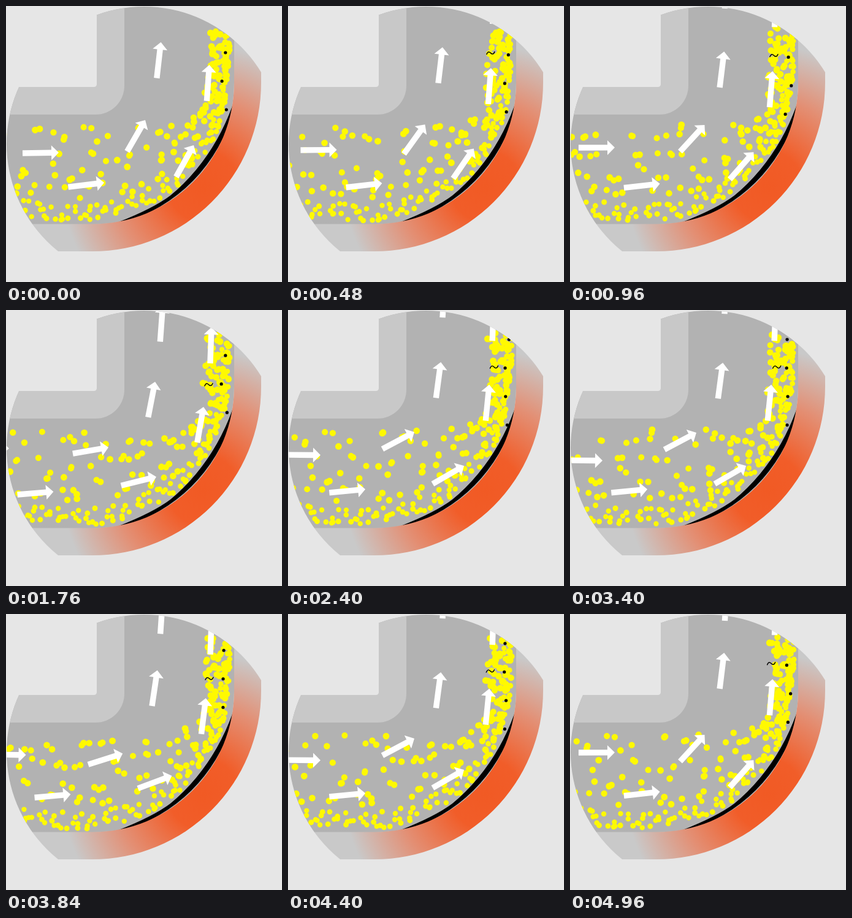
An HTML page for the animation above (5 s loop, 450 by 450 pixels).

```html
<!DOCTYPE html>
<html lang="en">
<head>
<meta charset="utf-8">
<title>Flow erosion in a pipe bend</title>
<style>
html, body { margin: 0; width: 100%; height: 100%; overflow: hidden; background: #e6e6e6; }
svg { display: block; width: 100vw; height: 100vh; }
</style>
</head>
<body>
<svg viewBox="0 0 450 450">
  <defs>
    <clipPath id="lens"><circle cx="225" cy="225" r="224"/></clipPath>
    <radialGradient id="heat" gradientUnits="userSpaceOnUse" cx="322" cy="294" r="230">
      <stop offset="0" stop-color="#f15a24"/>
      <stop offset=".25" stop-color="#f15d29"/>
      <stop offset=".62" stop-color="#e38f74"/>
      <stop offset="1" stop-color="#c9c9c9"/>
    </radialGradient>
  </defs>
  <g clip-path="url(#lens)">
    <path fill="#b2b2b2" d="M148 0V132H0V356H141A231 231 0 0 0 372 124V0Z"/>
    <path fill="#c8c8c8" d="M148 0V127Q148 132 143 132H0V177H146A47 47 0 0 0 193 130V0Z"/>
    <path id="dots" fill="#fff900"/>
    <path d="M184 352Q240 330 268 309Q290 291 310 267Q348 221 369 163L374 164Q330 310 186 356Z"/>
    <path fill="url(#heat)" d="M0 355.500H141A231 231 0 0 0 372 124.500V0H416V125A275 275 0 0 1 141 400H0Z"/>
    <path id="specks"/>
    <path id="curls" fill="none" stroke="#000" stroke-width="1.500" stroke-linecap="round"/>
    <path id="arrows" fill="#fff"/>
  </g>
</svg>
<script>
const FRAME = 40, COUNT = 125, CYCLE = 64, BEAT = 12.5;
const el = id => document.getElementById(id);
const mod = (a, n) => ((a % n) + n) % n;
const px = v => v.toFixed(2);

let seed = 29;
function rand(lo = 0, hi = 1) {
  seed = (seed * 1664525 + 1013904223) % 4294967296;
  return lo + (hi - lo) * seed / 4294967296;
}
const randoms = (n, lo, hi) => Array.from({ length: n }, () => rand(lo, hi));

// Smooth curve through rows of [time, ...values]
function spline(keys, t) {
  const last = keys.length - 1;
  let i = 0;
  while (i < last - 1 && keys[i + 1][0] < t) i++;
  const a = keys[i], b = keys[i + 1], h = b[0] - a[0], k = (t - a[0]) / h;
  const slope = (j, n) => (keys[j + 1][n] - keys[j][n]) / (keys[j + 1][0] - keys[j][0]);
  const tangent = (j, n) => {
    if (j === 0) return slope(0, n);
    if (j === last) return slope(last - 1, n);
    const l = keys[j][0] - keys[j - 1][0], r = keys[j + 1][0] - keys[j][0];
    return (slope(j - 1, n) * r + slope(j, n) * l) / (l + r);
  };
  return a.slice(1).map((v, m) => {
    const n = m + 1, w = k * k * (3 - 2 * k);
    return v * (1 - w) + b[n] * w
      + h * k * (1 - k) * ((1 - k) * tangent(i, n) - k * tangent(i + 1, n));
  });
}

// Dot streams: centre line, lane width, and how far the bend squeezes it
const streams = [
  { n: 56, lo: -5, hi: 22, r: 5, life: 51, from: 16, to: 24, squeeze: .8,
    keys: [[0, 0, 203], [12, 196, 198], [18, 283, 194], [22, 316, 178], [30, 324, 126], [52, 330, 26]] },
  { n: 88, lo: -36, hi: 40, r: 5, life: 75, from: 20, to: 42, squeeze: .45,
    keys: [[0, 0, 268], [20, 193, 268], [32, 290, 228], [42, 333, 176], [52, 343, 130], [76, 348, 30]] },
  { n: 60, lo: -15, hi: 13, r: 4.1, life: 120, from: 40, to: 80, squeeze: .5,
    keys: [[0, 0, 331], [40, 184, 330], [60, 273, 287], [76, 327, 224], [88, 347, 178], [100, 356, 130], [124, 360, 30]] }
];

const dots = streams.flatMap(s => randoms(s.n, 0, 3).map((jitter, i) => ({
  s, phase: i * CYCLE / s.n + jitter, off: rand(s.lo, s.hi),
  r: s.r + rand(0, .5), life: s.life - rand(0, 4)
})));

function disc(x, y, r) {
  const arc = `a${r} ${r} 0 1 0 `;
  return `M${px(x - r)} ${px(y)}${arc}${2 * r} 0${arc}${-2 * r} 0`;
}

function place({ s, off }, t) {
  const [x, y] = spline(s.keys, t), [u, v] = spline(s.keys, t + 1);
  const bend = Math.min(1, Math.max(0, (t - s.from) / (s.to - s.from)));
  const k = off * (1 - (1 - s.squeeze) * bend) / Math.hypot(u - x, v - y);
  return [x - (v - y) * k, y + (u - x) * k];
}

function drawDots(f) {
  let d = '';
  for (const p of dots)
    for (let t = mod(p.phase + f, CYCLE) - 1; t < p.life; t += CYCLE)
      d += disc(...place(p, t), p.r);
  return d;
}

// Arrow tips: time, x, y, angle
const upperPath = [[0, -86, 224, 0], [12.5, 86, 224, -1], [19, 167, 214, -10], [22.5, 206, 199, -28],
  [25, 227, 173, -60], [31.5, 243, 111, -79], [37.5, 252.5, 49, -83.5], [50, 256, -78, -87]];
const lowerPath = [[0, -14, 302, -4], [12.5, 160, 288, -7], [19, 245, 272, -14], [22.5, 287, 254, -30],
  [25, 306, 227, -61], [31.5, 322, 158, -80], [37.5, 331.5, 96, -86], [50, 336, -35, -88]];
const shape = [[0, 0], [-12, -12], [-12, -4.7], [-59, -4.7], [-59, 4.7], [-12, 4.7], [-12, 12]];
const drops = [10, 13, 15, 10, 6, 10, 0, 11, 1, 20, 4, 13, 1];

function arrow([x, y, deg], drop) {
  const a = deg * Math.PI / 180, c = Math.cos(a), s = Math.sin(a);
  const points = shape.map(([u, v]) => `${px(x + u * c - v * s)} ${px(y + drop + u * s + v * c)}`);
  return `M${points.join('L')}Z`;
}

function drawArrows(f) {
  let d = '';
  for (let u = f % BEAT; u < 50; u += BEAT) {
    const n = Math.round((f - u) / BEAT);
    d += arrow(spline(upperPath, u), drops[mod(n + 3, drops.length)]) + arrow(spline(lowerPath, u), 0);
  }
  return d;
}

const speckX = randoms(23, 349, 361);
const drawSpecks = f => speckX.map((x, n) => {
  const y = 76 + 46.5 * n - 7.44 * f;
  return y > 44 && y < 190 ? disc(x, y, 2.6) : '';
}).join('');

const curlX = randoms(10, 328, 343);
const drawCurls = f => curlX.map((x, n) => {
  const y = 175 - 8.2 * (f - n * BEAT);
  return y > 45 && y < 130 ? `M${px(x - 6.5)} ${px(y + 2)}c2 -5 4.500 -4 6.500 -2s4.500 3 6.500 -2` : '';
}).join('');

const layers = { dots: drawDots, specks: drawSpecks, curls: drawCurls, arrows: drawArrows };
let shown = -1;
function render(ms) {
  const f = Math.floor(ms / FRAME) % COUNT;
  if (f === shown) return;
  shown = f;
  for (const id in layers) el(id).setAttribute('d', layers[id](f));
}

const start = performance.now();
function tick() {
  render(performance.now() - start);
  requestAnimationFrame(tick);
}
tick();
</script>
</body>
</html>
```
